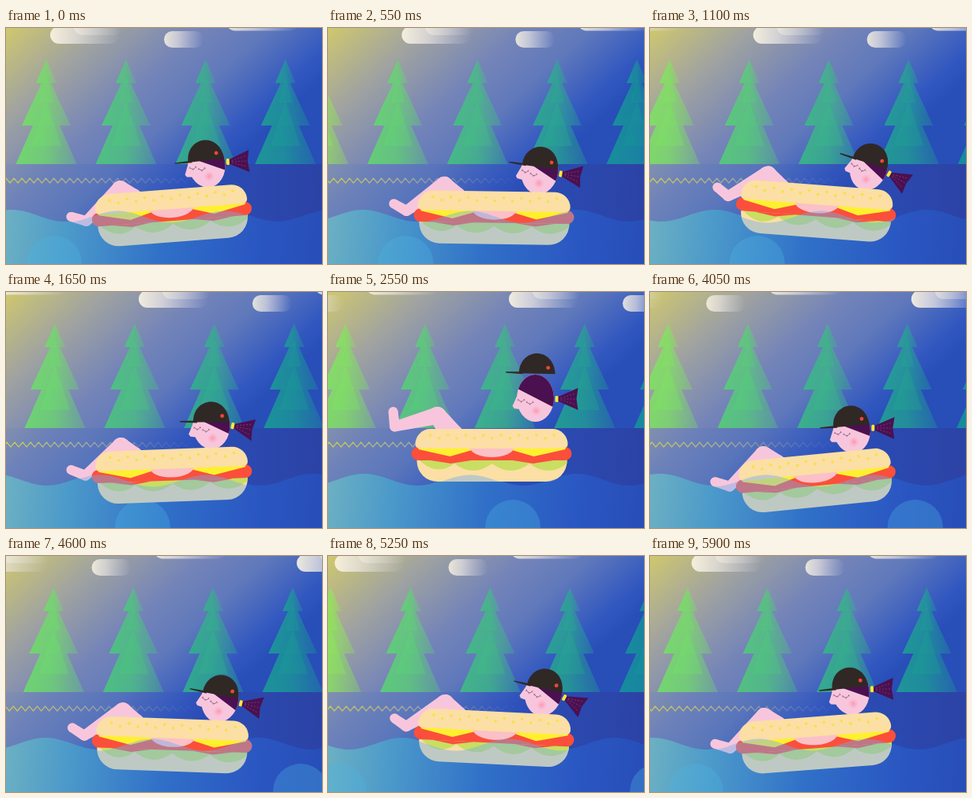
Write an HTML page with a canvas that moves like this. It is 400 px wide and 300 px high and loops after 5950 ms.

```html
<!DOCTYPE html>
<html lang="en">
<head>
<meta charset="utf-8">
<title>Sandwich float</title>
<style>
html, body { margin: 0; width: 100%; height: 100%; overflow: hidden; background: #284eb8; }
canvas { display: block; width: 400px; height: 300px; }
</style>
</head>
<body>
<canvas id="stage" width="400" height="300"></canvas>
<script>
const stage = document.getElementById('stage').getContext('2d');
const layerCanvas = document.createElement('canvas');
layerCanvas.width = 400;
layerCanvas.height = 300;
const layer = layerCanvas.getContext('2d');
let ctx = stage;

const LOOP = 5950, STEP = 50, SPAN = 403.6, TAU = Math.PI * 2;
const PINK = '#f8c6dc', HAIR = '#4b1050', BUN = '#fbdfa4', RED = '#fb4f3c', CAP = '#302825';

const lerp = (a, b, u) => a + (b - a) * u;
const rad = d => d * Math.PI / 180;

// Smooth 0-1-0 swell between two times
function bump(t, from, to) {
  const u = (t - from) / (to - from);
  return u > 0 && u < 1 ? Math.sin(u * Math.PI) ** 2 : 0;
}

// Three slow rocks per loop, one leap, and a wobble after landing
function poseAt(t) {
  const phase = TAU * 3 * t / LOOP;
  const swing = (1 - Math.cos(phase)) / 2;
  const jump = bump(t, 2150, 2950), settle = bump(t, 2850, 4250);
  const calm = 1 - jump;
  const tilt = (-8 + 25 * swing + 6 * settle) * calm;
  return {
    x: 210.5 - 3 * jump,
    y: 236 + 5.5 * Math.sin(phase + .38) - 33.5 * jump,
    rot: (-4.4 + 9 * swing - 7.5 * settle) * calm,
    headX: 51 + tilt + 4 * jump,
    headY: -65 + .4 * tilt - 10 * jump,
    tilt,
    tail: (13 - 17 * Math.cos(phase - .44) + 24 * settle) * calm,
    legs: lerp(.27 * swing + .28 * settle, 1, jump),
    hat: 27 * bump(t, 2200, 2950)
  };
}

function ramp(x0, y0, x1, y1, stops) {
  const g = ctx.createLinearGradient(x0, y0, x1, y1);
  stops.forEach(([p, c]) => g.addColorStop(p, c));
  return g;
}

function poly(pts, fill) {
  ctx.beginPath();
  pts.forEach(([x, y]) => ctx.lineTo(x, y));
  ctx.closePath();
  ctx.fillStyle = fill;
  ctx.fill();
}

function disc(x, y, r, fill) {
  ctx.beginPath();
  ctx.arc(x, y, r, 0, TAU);
  ctx.fillStyle = fill;
  ctx.fill();
}

function pill(x, y, w, h, r, fill) {
  ctx.beginPath();
  ctx.roundRect(x, y, w, h, r);
  ctx.fillStyle = fill;
  ctx.fill();
}

const SKY = ramp(-10, -10, 215, 235, [
  [0, '#d8ce62'], [.13, '#bfbb80'], [.3, '#a0a3a0'], [.55, '#7484b8'], [.72, '#6079bb'], [.92, '#3258c0'], [1, '#284eb8']
]);
const GROUND = ramp(0, 0, 400, 0, [
  [0, 'rgba(70,120,190,.12)'], [.5, 'rgba(45,80,185,.25)'], [1, 'rgba(52,45,130,.35)']
]);
const WATER = ramp(0, 232, 400, 275, [
  [0, '#6cb0c2'], [.2, '#4c9aca'], [.5, '#3070c8'], [.8, '#2a56c2'], [1, '#284eb8']
]);
const FENCE = ramp(0, 0, 245, 0, [
  [0, '#c8c95c'], [.4, '#a4a99a'], [1, 'rgba(105,125,190,0)']
]);

// Repeats scenery across the seam
function wrapped(x, shift, w, draw) {
  const p = (x + shift) % SPAN;
  draw(p);
  if (p + w > SPAN) draw(p - SPAN);
}

function cloud(x, y, w, h, a) {
  pill(x, y, w, h, h / 2, ramp(x, 0, x + w, 0, [
    [0, `rgba(250,244,226,${a})`], [.35, `rgba(235,230,228,${a * .8})`], [1, 'rgba(215,215,230,0)']
  ]));
}

function clouds(s) {
  wrapped(56, s, 95, x => {
    cloud(x, -2, 88, 22, .92);
    cloud(x + 30, -12, 62, 21, .5);
  });
  wrapped(200, s, 52, x => cloud(x, 4, 50, 21, .85));
  wrapped(279, s, 95, x => cloud(x, -18, 92, 21.5, .85));
}

function tree(x) {
  const u = Math.max(0, Math.min(1, x / 400));
  const rgb = `${lerp(145, 18, u ** .6)},${lerp(240, 155, u)},${lerp(75, 150, u ** .6)}`;
  const tiers = [[40, 0, 70, 13], [70, 6, 124, 31], [124, 17, 173, 38.5]];
  tiers.forEach(([top, a, bottom, b]) => {
    poly([[x - a, top], [x + a, top], [x + b, bottom], [x - b, bottom]],
      ramp(x - b, bottom, x + b, bottom - b * .3, [
        [0, `rgba(${rgb},.82)`], [.5, `rgba(${rgb},.68)`], [1, `rgba(${rgb},.25)`]
      ]));
  });
  // inner shade spilling below each tier
  [[60, 95, 9], [92, 150, 19]].forEach(([top, bottom, w]) => {
    poly([[x, top], [x + w, bottom], [x - w, bottom]], `rgba(${rgb},.3)`);
  });
}

function fence(s) {
  ctx.beginPath();
  const w = SPAN / 40;
  for (let x = s % w - w, k = 0; x < 260; x += w / 2, k++) ctx.lineTo(x, k % 2 ? 197 : 191);
  ctx.strokeStyle = FENCE;
  ctx.lineWidth = 1.2;
  ctx.stroke();
}

function water(s, level, fill) {
  ctx.beginPath();
  ctx.moveTo(0, 300);
  for (let x = 0; x <= 400; x += 4) {
    ctx.lineTo(x, level - 7.5 * Math.cos((x - 7 - s) * TAU * 3 / SPAN));
  }
  ctx.lineTo(400, 300);
  ctx.fillStyle = fill;
  ctx.fill();
}

function limb(x0, y0, r0, x1, y1, r1) {
  const a = Math.atan2(y1 - y0, x1 - x0) + Math.PI / 2, c = Math.cos(a), n = Math.sin(a);
  disc(x0, y0, r0, PINK);
  disc(x1, y1, r1, PINK);
  poly([[x0 + c * r0, y0 + n * r0], [x1 + c * r1, y1 + n * r1],
        [x1 - c * r1, y1 - n * r1], [x0 - c * r0, y0 - n * r0]], PINK);
}

function legs(k) {
  const toe = [lerp(-128, -125, k), lerp(-8, -55, k)];
  const heel = [lerp(-109, -123, k), lerp(-1, -36, k)];
  const knee = [lerp(-63, -69, k), lerp(-38, -50, k)];
  limb(...toe, 6, ...heel, 6.5);
  limb(...heel, 6.5, ...knee, 11);
  limb(...knee, 11, -49, -24, 14);
}

function sandwich() {
  pill(-95, 0, 190, 34, [8, 8, 26, 26], BUN);
  ctx.beginPath();
  ctx.moveTo(-95, 4);
  for (let i = 0; i < 4; i++) {
    const x = -95 + i * 47.5;
    ctx.quadraticCurveTo(x + 24, 29, x + 47.5, 11);
  }
  ctx.lineTo(95, 4);
  ctx.fillStyle = '#c9de62';
  ctx.fill();
  pill(-102, -10, 203, 17, 8.5, RED);
  for (const side of [-1, 1]) {
    poly([[side * 93, -11], [side * 93, -7], [side * 53, 2], [side * 22, -7], [side * 22, -11]], '#fff02e');
    poly([[side * 78, 7], [side * 52, 11], [side * 26, 7]], RED);
  }
  ctx.beginPath();
  ctx.ellipse(0, -10, 28, 13, 0, 0, Math.PI);
  ctx.fillStyle = '#fbc0c8';
  ctx.fill();
  pill(-97, -33, 193, 25, [24, 24, 7, 7], BUN);
  for (let i = 0; i < 15; i++) {
    disc(-78 + i * 11.2, -23 + (i % 2 ? 2 : -2), 1.8, '#f8e04a');
  }
}

function ponytail(angle) {
  ctx.save();
  ctx.translate(27, 4);
  ctx.rotate(angle);
  poly([[0, -2], [27, -14], [25, 0], [27, 14], [0, 2]], HAIR);
  ctx.strokeStyle = 'rgba(190,110,170,.55)';
  ctx.lineWidth = .7;
  ctx.setLineDash([2, 2]);
  for (let y = -7; y <= 7; y += 7) {
    ctx.beginPath();
    ctx.moveTo(5, y * .2);
    ctx.lineTo(24, y);
    ctx.stroke();
  }
  ctx.setLineDash([]);
  pill(-2, -4, 4, 8, 1.5, '#ffe83a');
  ctx.restore();
}

function eye(x, y) {
  ctx.beginPath();
  ctx.arc(x, y, 4, .2, Math.PI - .2);
  for (let a = .5; a < 3; a += 1.07) {
    ctx.moveTo(x + 4 * Math.cos(a), y + 4 * Math.sin(a));
    ctx.lineTo(x + 5.6 * Math.cos(a), y + 5.6 * Math.sin(a));
  }
  ctx.strokeStyle = '#7d4a78';
  ctx.lineWidth = .7;
  ctx.stroke();
}

function cap() {
  ctx.beginPath();
  ctx.moveTo(-23, -2);
  ctx.bezierCurveTo(-22, -35, 21, -37, 23, -1);
  ctx.closePath();
  ctx.fillStyle = CAP;
  ctx.fill();
  poly([[-40, -4], [-18, -4], [-18, -1], [-39, -2.6]], CAP);
  disc(14, -9, 2.4, '#ee4638');
}

function head(tilt, tail, lift) {
  ctx.save();
  ctx.rotate(rad(tilt));
  ponytail(rad(tail - tilt));
  poly([[-21, -5], [-29, 13], [-27, 16], [-20, 17]], PINK);
  ctx.beginPath();
  ctx.ellipse(0, 3, 23.5, 30, 0, 0, TAU);
  ctx.fillStyle = PINK;
  ctx.fill();
  ctx.save();
  ctx.clip();
  poly([[-30, -13], [-30, -40], [30, -40], [30, 18]], HAIR);
  ctx.restore();
  const glow = ctx.createRadialGradient(1, 19, 0, 1, 19, 7);
  glow.addColorStop(0, 'rgba(255,120,150,.6)');
  glow.addColorStop(1, 'rgba(255,150,180,0)');
  disc(1, 19, 7, glow);
  eye(-18, 3);
  eye(-7, 6);
  ctx.translate(lift * .08, -lift);
  cap();
  ctx.restore();
}

function floater(t) {
  const p = poseAt(t);
  ctx.save();
  ctx.translate(p.x, p.y);
  ctx.save();
  ctx.translate(p.headX, p.headY);
  head(p.tilt, p.tail, p.hat);
  ctx.restore();
  ctx.rotate(rad(p.rot));
  legs(p.legs);
  sandwich();
  ctx.restore();
}

// The figure on its own layer, tinted only where it is under water
function bather(t, s) {
  ctx = layer;
  ctx.clearRect(0, 0, 400, 300);
  floater(t);
  ctx.globalCompositeOperation = 'source-atop';
  water(s, 240, 'rgba(110,172,238,.42)');
  ctx.globalCompositeOperation = 'source-over';
  ctx = stage;
  ctx.drawImage(layerCanvas, 0, 0);
}

function draw(t) {
  const s = SPAN * t / LOOP;
  ctx.fillStyle = SKY;
  ctx.fillRect(0, 0, 400, 300);
  clouds(s);
  const gap = SPAN / 4;
  for (let x = (51 + s) % gap - gap; x < 445; x += gap) tree(x);
  ctx.fillStyle = GROUND;
  ctx.fillRect(0, 173, 400, 127);
  fence(s);
  water(s, 238.5, WATER);
  wrapped(26, s, 70, x => disc(x + 35, 299, 35, 'rgba(75,180,225,.32)'));
  bather(t, s);
}

function tick() {
  const t = performance.now() % LOOP;
  draw(Math.floor(t / STEP) * STEP);
  requestAnimationFrame(tick);
}
tick();
</script>
</body>
</html>
```
